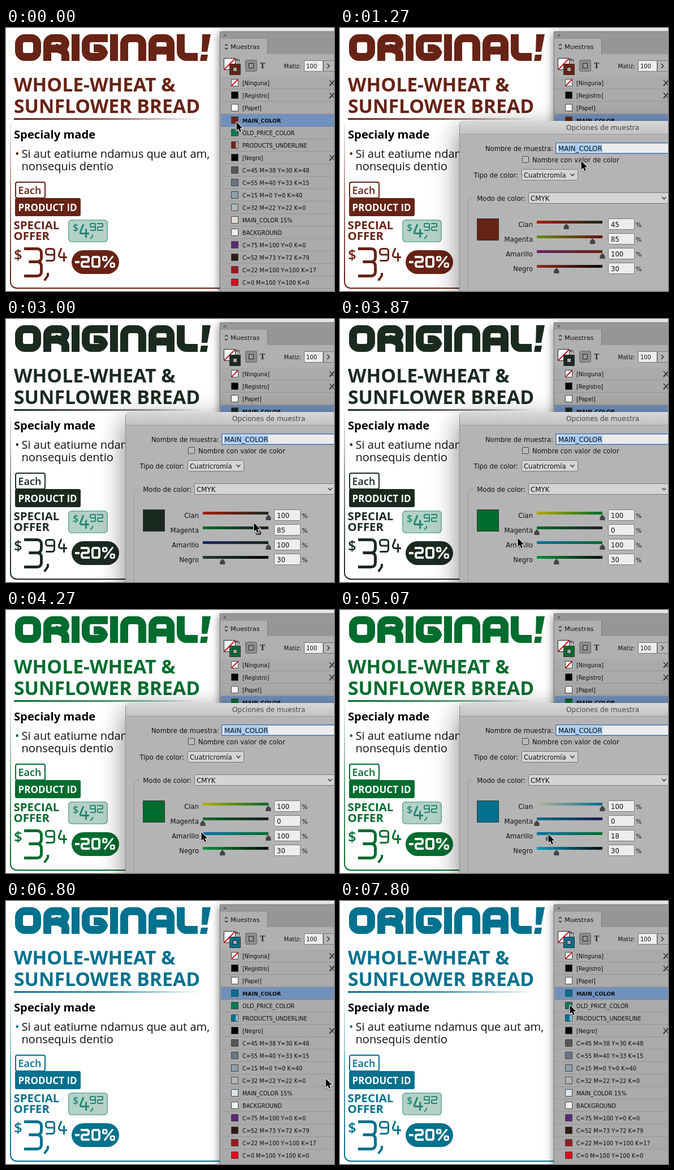
An HTML page with a canvas for the animation above (8 s loop, 580 by 464 pixels).

```html
<!DOCTYPE html>
<html lang="es">
<head>
<meta charset="utf-8">
<title>Muestras</title>
<style>
html, body { margin: 0; width: 100%; height: 100%; overflow: hidden; background: #fff; }
canvas { display: block; }
</style>
</head>
<body>
<canvas id="stage" width="580" height="464"></canvas>
<script>
const ctx = document.getElementById('stage').getContext('2d');
const LOOP = 8000, STEP = 1000 / 15;
const SANS = '"Open Sans", "Noto Sans", sans-serif';
const UI = '"DejaVu Sans", sans-serif';
const lerp = (a, b, k) => a + (b - a) * k;
const mixRgb = (a, b, k) => a.map((v, i) => lerp(v, b[i], k));
const css = (c, alpha = 1) => `rgba(${c.map(Math.round).join()},${alpha})`;

// Ink overprints indexed by bits: cyan 1, magenta 2, yellow 4
const INKS = [[255, 255, 255], [0, 159, 227], [230, 0, 126], [49, 39, 131],
  [255, 237, 0], [0, 150, 64], [227, 6, 19], [44, 42, 42]];

function cmyk(c, m, y, k) {
  const p = [c, m, y].map(v => v / 100);
  const sum = [0, 0, 0];
  INKS.forEach((ink, bits) => {
    const w = p.reduce((a, v, i) => a * (bits >> i & 1 ? v : 1 - v), 1);
    ink.forEach((v, i) => { sum[i] += v * w; });
  });
  return mixRgb(sum, sum.map(v => v * 0.06), k / 100);
}

// ---- timeline ----
const DIALOG_OPEN = 400, DIALOG_CLOSE = 6470;
const EDITS = [[0, [45, 85, 100, 30]], [2130, [84, 85, 100, 30]], [2470, [100, 85, 100, 30]],
  [3400, [100, 0, 100, 30]], [4730, [100, 0, 18, 30]]];
const APPLIED = [[0, [45, 85, 100, 30]], [2730, [100, 85, 100, 30]],
  [4060, [100, 0, 100, 30]], [5270, [100, 0, 18, 30]]];
// time, x, y of the pointer
const PATH = [[0, 407, 165], [1000, 407, 165], [1130, 426, 234], [1330, 426, 234],
  [2000, 446, 345], [2130, 446, 345], [2330, 467, 345], [2530, 465, 345], [2930, 446, 358],
  [3350, 348, 370], [3450, 348, 370], [3600, 315, 386], [3870, 314, 386], [4600, 368, 395],
  [5070, 368, 395], [5700, 600, 300], [6600, 600, 330], [7270, 442, 252],
  [7400, 436, 244], [7780, 406, 183], [8000, 406, 183]];

const at = (keys, t) => keys.filter(k => k[0] <= t).pop()[1];

function pointer(t) {
  const i = Math.max(1, PATH.findIndex(p => p[0] > t));
  const [t0, x0, y0] = PATH[i - 1], [t1, x1, y1] = PATH[i];
  const k = (t - t0) / (t1 - t0), e = k * k * (3 - 2 * k);
  return [lerp(x0, x1, e), lerp(y0, y1, e)];
}

// ---- drawing helpers ----
function text(s, x, y, size, color = '#111', weight = 400, family = UI, align = 'left') {
  ctx.font = `${weight} ${size}px ${family}`;
  ctx.fillStyle = color;
  ctx.textAlign = align;
  ctx.fillText(s, x, y);
}

function rect(x, y, w, h, fill, stroke, r = 0, lw = 1) {
  const o = stroke ? lw / 2 : 0;
  ctx.beginPath();
  ctx.roundRect(x + o, y + o, w - 2 * o, h - 2 * o, r);
  if (fill) { ctx.fillStyle = fill; ctx.fill(); }
  if (stroke) { ctx.strokeStyle = stroke; ctx.lineWidth = lw; ctx.stroke(); }
}

function line(pts, color, lw = 1) {
  ctx.beginPath();
  pts.forEach(p => ctx.lineTo(...p));
  ctx.strokeStyle = color;
  ctx.lineWidth = lw;
  ctx.stroke();
}

function poly(pts, fill) {
  ctx.beginPath();
  pts.forEach(p => ctx.lineTo(...p));
  ctx.closePath();
  ctx.fillStyle = fill;
  ctx.fill();
}

function ramp(x0, y0, x1, y1, ...stops) {
  const g = ctx.createLinearGradient(x0, y0, x1, y1);
  stops.forEach((c, i) => g.addColorStop(i / (stops.length - 1), c));
  return g;
}

function shadowed(alpha, blur, dx, dy, draw) {
  ctx.save();
  ctx.shadowColor = `rgba(0,0,0,${alpha})`;
  ctx.shadowBlur = blur;
  ctx.shadowOffsetX = dx;
  ctx.shadowOffsetY = dy;
  draw();
  ctx.restore();
}

// Square display letters as pen strokes inside a unit box; "z" closes a stroke
const GLYPHS = {
  O: '.5,0 1,0 1,1 0,1 0,0 z', R: '0,1 0,0 1,0 1,.56 .3,.56|.6,.56 1,.72 1,1', I: '0,0 0,1',
  G: '1,0 0,0 0,1 1,1 1,.54 .66,.54', N: '0,1 0,0 1,0 1,1', A: '0,1 0,0 1,0 1,1|0,.66 1,.66',
  L: '0,0 0,1 1,1', 0: '.5,0 1,0 1,1 0,1 0,0 z', 2: '0,0 1,0 1,.5 0,.5 0,1 1,1',
  3: '0,0 1,0 1,.48 .3,.48|.5,.48 1,.48 1,1 0,1', 4: '.4,0 0,.72 1,.72|.74,.4 .74,1',
  9: '1,.5 0,.5 0,0 1,0 1,1 .1,1', '-': '0,.5 1,.5', ',': '1,0 1,.3 0,1',
  '%': '.16,0 .32,0 .32,.36 0,.36 0,0 z|.84,.64 1,.64 1,1 .68,1 .68,.64 z|.84,0 .16,1'
};

function glyph(ch, x, y, w, h, lw, color, r = lw * 0.6) {
  const bx = x + lw / 2, by = y + lw / 2, bw = w - lw, bh = h - lw;
  ctx.strokeStyle = color;
  ctx.lineWidth = lw;
  ctx.lineCap = 'square';
  for (const part of GLYPHS[ch].split('|')) {
    const closed = part.endsWith('z');
    const pts = part.replace(' z', '').split(' ').map(p => {
      const [u, v] = p.split(',').map(Number);
      return [bx + u * bw, by + v * bh];
    });
    if (closed) pts.push(pts[0]);
    ctx.beginPath();
    ctx.moveTo(...pts[0]);
    for (let i = 1; i < pts.length - 1; i++) ctx.arcTo(...pts[i], ...pts[i + 1], r);
    ctx.lineTo(...pts[pts.length - 1]);
    if (closed) ctx.closePath();
    ctx.stroke();
  }
  ctx.lineCap = 'butt';
}

// ---- label layout ----
function drawLabel(main) {
  const c = css(main);
  let x = 16;
  for (const ch of 'ORIGINAL') {
    const w = { I: 14, L: 37 }[ch] || 46;
    glyph(ch, x, 11, w, 47, 14, c, 10);
    x += w + 4;
  }
  poly([[347, 11], [362, 11], [356, 42], [346, 42]], c);
  poly([[345, 47], [357, 47], [355, 58], [343, 58]], c);

  text('WHOLE-WHEAT &', 14, 112, 33.7, c, 700, SANS);
  text('SUNFLOWER BREAD', 14, 150, 33.7, c, 700, SANS);
  rect(14, 159, 332, 3, ramp(14, 0, 346, 0, c, css(main, 0.75), css(main, 0)));

  ctx.beginPath();
  ctx.moveTo(8, 168);
  ctx.arcTo(8, 459, 20, 459, 11);
  ctx.lineTo(380, 459);
  ctx.strokeStyle = ramp(0, 168, 0, 440, css(main, 0.08), css(main, 0.6), c);
  ctx.lineWidth = 2;
  ctx.stroke();

  text('Specialy made', 14, 195, 20.2, '#000', 700, SANS);
  text('•', 16, 229, 20, c, 400, SANS);
  text('Si aut eatiume ndamus que aut am,', 27.5, 229, 20.1, '#111', 400, SANS);
  text('nonsequis dentio', 27.5, 251, 20.1, '#111', 400, SANS);

  rect(16, 271, 54, 30, '#fff', c, 3, 2);
  text('Each', 21.5, 293, 18, c, 600, SANS);
  rect(16, 300, 116, 32, c, null, 3);
  text('PRODUCT ID', 21.5, 323, 17, '#fff', 700, SANS);
  text('SPECIAL', 13.5, 355, 20.4, c, 700, SANS);
  text('OFFER', 13.5, 374, 20.4, c, 700, SANS);

  const old = '#23876f';
  rect(110, 338, 70, 40, '#b4d1c7', null, 6);
  ctx.setLineDash([1.5, 1.5]);
  rect(110, 338, 70, 40, null, old, 6, 1.6);
  ctx.setLineDash([]);
  text('$', 118, 359, 18, old, 600, SANS);
  glyph('4', 129, 346, 18, 24, 3, old);
  glyph(',', 149, 365, 5, 7, 2, old);
  glyph('9', 148, 344, 11, 14, 2, old);
  glyph('2', 161, 344, 11, 14, 2, old);

  text('$', 14, 409, 26, c, 600, SANS);
  glyph('3', 32, 387, 33, 53, 5, c, 7);
  glyph(',', 67, 432, 9, 14, 4, c);
  glyph('9', 69, 388, 18, 24, 3, c, 4);
  glyph('4', 90, 388, 18, 24, 3, c, 4);

  rect(116, 392, 84, 42, c, null, 21);
  glyph('-', 122, 402, 8, 22, 4, '#fff');
  glyph('2', 132, 402, 16, 21, 4, '#fff');
  glyph('0', 151, 402, 16, 21, 4, '#fff');
  glyph('%', 170, 402, 23, 21, 3, '#fff', 2);
}

// ---- swatch panel ----
const INK_ROWS = [[45, 38, 30, 48], [55, 40, 33, 15], [15, 0, 0, 40], [32, 22, 22, 0]];
const LOW_ROWS = [[75, 100, 0, 0], [52, 73, 72, 79], [22, 100, 100, 17], [0, 100, 100, 0]];
const INK_FILLS = ['#595655', '#697686', '#8c9fae', '#aeb5b9'];
const LOW_FILLS = ['#5c2a79', '#2d1c17', '#9b1a21', '#dc0b1c'];
const inkName = v => 'CMYK'.split('').map((n, i) => `${n}=${v[i]}`).join(' ');

function drawPanel(main) {
  const c = css(main);
  shadowed(0.5, 14, -1, 3, () => rect(378, 6, 220, 480, '#aaa'));
  rect(378, 6, 202, 12, '#989898');
  line([[384.5, 10.5], [389.5, 15.5]], '#444');
  line([[389.5, 10.5], [384.5, 15.5]], '#444');
  rect(378, 18, 202, 28, '#969696');
  rect(379, 19, 83, 28, '#b0b0b0');
  line([[462.5, 19], [462.5, 46]], '#7d7d7d');
  rect(379, 46, 201, 40, '#b0b0b0');
  line([[387, 31], [389.5, 28.5], [392, 31]], '#222', 1.2);
  line([[387, 35], [389.5, 37.5], [392, 35]], '#222', 1.2);
  text('Muestras', 397, 37, 11.3);

  rect(385, 53, 21, 21, '#fff', '#222');
  line([[386, 73], [405, 54]], '#d4101c', 2);
  rect(395, 63, 20, 20, c, '#333');
  rect(401, 69, 8, 8, '#aaa', '#222');
  line([[408, 56], [412.5, 56], [412.5, 60]], '#333');
  poly([[406, 56], [409, 53.5], [409, 58.5]], '#333');
  rect(423, 56, 21, 21, '#8b8b8b', '#6a6a6a', 2);
  rect(429, 62, 9, 9, '#999', '#222');
  text('T', 449, 71, 14, '#222', 700, '"Liberation Serif", serif');
  text('Matiz:', 491.5, 71, 10);
  rect(527, 57, 34, 20, '#ededed', '#777');
  text('100', 531, 71, 10);
  rect(561, 57, 24, 20, '#b8b8b8', '#777');
  line([[568, 63], [572, 67], [568, 71]], '#222', 1.3);

  const tint = k => css(mixRgb([255, 255, 255], main, k));
  const rows = [['[Ninguna]', '#fff'], ['[Registro]', '#000'], ['[Papel]', '#fff'],
    ['MAIN_COLOR', c], ['OLD_PRICE_COLOR', '#087a56'],
    ['PRODUCTS_UNDERLINE', ramp(398, 0, 411, 0, c, css(main), '#fff')], ['[Negro]', '#000'],
    ...INK_ROWS.map((v, i) => [inkName(v), INK_FILLS[i]]),
    ['MAIN_COLOR 15%', tint(0.17)], ['BACKGROUND', ramp(398, 0, 411, 0, tint(0.14), '#fff')],
    ...LOW_ROWS.map((v, i) => [inkName(v), LOW_FILLS[i]])];
  rows.forEach(([name, fill], i) => {
    const y = 86 + 22 * i;
    const picked = i === 3;
    rect(380, y, 200, 22, picked ? '#7191bd' : '#aaa');
    rect(380, y + 21, 200, 1, picked ? '#6482ac' : '#979797');
    rect(398, y + 4, 13, 13, fill, '#444');
    if (i === 0) line([[399, y + 16], [410, y + 5]], '#d4101c', 2);
    text(name, 418, y + 15, picked ? 9.4 : 9.7, '#0c0c0c', picked ? 700 : 400);
    if ([0, 1, 6].includes(i)) {
      line([[572, y + 6], [581, y + 16]], '#333', 1.2);
      line([[572, y + 16], [581, y + 6]], '#333', 2);
    }
  });
  rect(380, 460, 200, 4, '#aaa');
  line([[378.5, 6], [378.5, 464]], '#777');
  line([[378, 6.5], [580, 6.5]], '#777');
}

// ---- options dialog ----
function chevron(x, y) {
  line([[x - 3.5, y - 2], [x, y + 2], [x + 3.5, y - 2]], '#333', 1.3);
}

function drawDialog(inks) {
  shadowed(0.5, 46, 0, 14, () => rect(211, 164, 500, 500, '#b4b4b4', null, 6));
  rect(211, 164, 400, 23, ramp(0, 164, 0, 187, '#d8d8d8', '#c2c2c2'), null, [6, 0, 0, 0]);
  line([[211, 187.5], [580, 187.5]], '#999');
  line([[211.5, 169], [211.5, 464]], '#8f8f8f');
  text('Opciones de muestra', 400, 180, 12.1, '#444');

  text('Nombre de muestra:', 377, 217, 11.6, '#111', 400, UI, 'right');
  rect(381, 202, 220, 20, '#ececec', '#3f6fb5', 1, 1.5);
  rect(386, 205, 78, 14, '#a9cdf5');
  text('MAIN_COLOR', 386, 217, 11.8);
  rect(322, 226, 12, 12, '#bcbcbc', '#444', 1);
  text('Nombre con valor de color', 340, 237, 11.6);
  text('Tipo de color:', 315, 264, 11.6, '#111', 400, UI, 'right');
  rect(321, 249, 100, 20, '#d4d4d4', '#777', 1);
  text('Cuatricromía', 325, 264, 11.6);
  chevron(411, 259);

  ctx.beginPath();
  ctx.moveTo(236, 300.5);
  ctx.arcTo(226.5, 300.5, 226.5, 310, 4);
  ctx.lineTo(226.5, 464);
  ctx.strokeStyle = '#999';
  ctx.lineWidth = 1;
  ctx.stroke();
  text('Modo de color:', 328, 305, 11.6, '#111', 400, UI, 'right');
  rect(333, 290, 260, 20, '#d4d4d4', '#777', 1);
  text('CMYK', 337, 305, 11.9);
  chevron(573, 300);

  rect(242, 336, 39, 39, css(cmyk(...inks)), '#333');
  ['Cian', 'Magenta', 'Amarillo', 'Negro'].forEach((name, i) => {
    const y = 346 + 26 * i;
    const stops = [0, 50, 100].map(v => css(cmyk(...inks.map((p, j) => j === i ? v : p))));
    text(name, 341, y + 5, 11.6, '#111', 400, UI, 'right');
    rect(348, y - 6, 116, 5, ramp(348, 0, 464, 0, ...stops));
    const x = 348 + 1.16 * inks[i];
    poly([[x, y - 1], [x + 4.5, y + 4], [x + 4.5, y + 9], [x - 4.5, y + 9], [x - 4.5, y + 4]], '#444');
    rect(474, y - 10, 47, 20, '#ededed', '#777', 1);
    text(String(inks[i]), 479, y + 5, 11.6);
    text('%', 523, y + 5, 11);
  });
}

function drawPointer(x, y) {
  ctx.save();
  ctx.translate(x, y);
  const arrow = [[0.5, 0.5], [0.5, 16], [4, 12.8], [6.4, 18.4], [9, 17.3], [6.6, 11.8], [11.5, 11.6]];
  shadowed(0.35, 3, 0, 1, () => {
    ctx.lineJoin = 'round';
    line([...arrow, arrow[0]], '#fff', 2.4);
  });
  poly(arrow, '#000');
  ctx.restore();
}

function render(t) {
  const main = cmyk(...at(APPLIED, t));
  ctx.clearRect(0, 0, 580, 464);
  ctx.lineJoin = 'miter';
  rect(0, 0, 580, 464, '#fff');
  drawLabel(main);
  drawPanel(main);
  if (t >= DIALOG_OPEN && t < DIALOG_CLOSE) {
    ctx.globalAlpha = Math.min(1, 0.4 + (t - DIALOG_OPEN) / 220);
    drawDialog(at(EDITS, t));
    ctx.globalAlpha = 1;
  }
  drawPointer(...pointer(t));
}

const start = performance.now();
function tick() {
  const t = (performance.now() - start) % LOOP;
  render(Math.min(LOOP - 1, Math.floor((t + 4) / STEP) * STEP + 4));
  requestAnimationFrame(tick);
}
tick();
</script>
</body>
</html>
```
